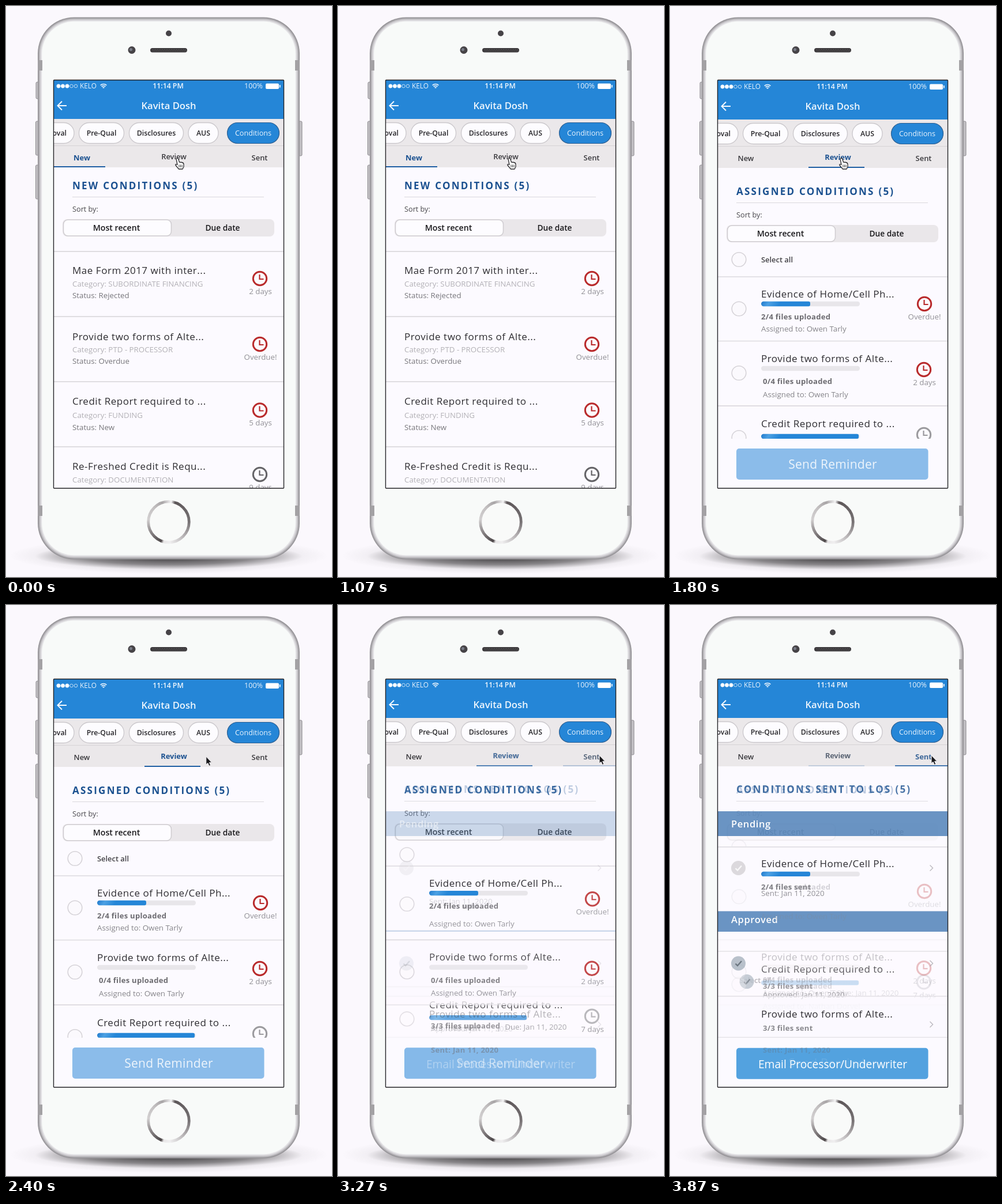
An HTML page with a canvas for the animation above (3.94 s loop, 565 by 991 pixels).

```html
<!DOCTYPE html>
<html lang="en">
<head>
<meta charset="utf-8">
<title>Loan conditions</title>
<style>
html, body { margin: 0; width: 100%; height: 100%; overflow: hidden; background: #fbf8fd; }
canvas { display: block; width: 565px; height: 991px; }
</style>
</head>
<body>
<canvas id="stage" width="565" height="991"></canvas>
<script>
const c = document.getElementById('stage').getContext('2d');
const LOOP = 3940;
const BG = '#fcfaff', BLUE = '#2586d7', NAVY = '#1b5190', RED = '#b92b2c', LINE = '#dfdde1';
const SENT_ON = 'Sent: Jan 11, 2020';

const lerp = (a, b, k) => a + (b - a) * k;
const clamp = k => Math.max(0, Math.min(1, k));
const ease = k => k * k * (3 - 2 * k);

// Draws with the current opacity multiplied by a.
function fade(a, draw) {
  if (a <= 0.003) return;
  c.save();
  c.globalAlpha *= Math.min(1, a);
  draw();
  c.restore();
}

// y is the middle of the capital letters.
function text(s, x, y, size, color, weight = 400, align = 'left', gap = 0) {
  c.font = `${weight} ${size}px "Open Sans", "Noto Sans", sans-serif`;
  c.letterSpacing = gap + 'px';
  c.textAlign = align;
  c.fillStyle = color;
  c.fillText(s, x, y + size * 0.357);
}

function rect(x, y, w, h, color) {
  c.fillStyle = color;
  c.fillRect(x, y, w, h);
}

function round(x, y, w, h, r, fill, stroke, lw = 1) {
  c.beginPath();
  c.roundRect(x, y, w, h, r);
  if (fill) { c.fillStyle = fill; c.fill(); }
  if (stroke) { c.strokeStyle = stroke; c.lineWidth = lw; c.stroke(); }
}

function disc(x, y, r, fill, stroke, lw = 1) {
  c.beginPath();
  c.arc(x, y, r, 0, 7);
  if (fill) { c.fillStyle = fill; c.fill(); }
  if (stroke) { c.strokeStyle = stroke; c.lineWidth = lw; c.stroke(); }
}

function poly(pts, color, lw) {
  c.beginPath();
  for (let i = 0; i < pts.length; i += 2) c.lineTo(pts[i], pts[i + 1]);
  c.strokeStyle = color;
  c.lineWidth = lw;
  c.stroke();
}

const divider = (y, color = LINE, h = 1.6) => rect(83, y - h / 2, 398, h, color);
const rowTitle = (s, x, y) => text(s, x, y, 17, '#2e2d31', 400, 'left', 0.52);
const small = (s, x, y, color = '#86858a') => text(s, x, y, 13.3, color);
const files = (s, x, y) => text(s, x, y, 13, '#6c6b70', 700, 'left', 0.3);
const heading = (s, y) => text(s, 115, y, 17, NAVY, 700, 'left', 2.25);
const option = (y) => disc(119.5, y, 12.3, '#fbf9fd', '#d6d3d8', 1.6);

function clock(x, y, color) {
  disc(x, y, 11.7, null, color, 3);
  poly([x - 0.5, y - 7, x - 0.5, y + 1, x + 6.5, y + 1], color, 2.2);
}

function due(s, y) { text(s, 441, y, 13.3, '#929196', 400, 'center'); }

function tick(x, y, fill, mark) {
  disc(x, y, 12.5, fill);
  poly([x - 5, y + 0.5, x - 1.5, y + 4, x + 5.5, y - 4], mark, 2.4);
}

const chevron = y => poly([450.5, y - 5, 455.5, y, 450.5, y + 5], '#aaa8ae', 1.4);

function bar(y, w) {
  round(158, y - 4.2, 171, 8.4, 4.2, '#e8e6ea');
  if (!w) return;
  const g = c.createLinearGradient(158, y - 5, 190, y + 14);
  g.addColorStop(0, '#1f79cc');
  g.addColorStop(0.35, '#4ba0e3');
  g.addColorStop(0.8, BLUE);
  round(158, y - 4.2, w, 8.4, [4.2, 3, 3, 4.2], g);
}

// The label of a band comes in faster than its colour.
function band(y, s, a) {
  fade(a, () => rect(83, y, 398, 43, '#477bb4'));
  fade(a * 2, () => text(s, 106, y + 22, 16.5, '#fff', 600, 'left', 0.6));
}

function phone() {
  rect(0, 0, 565, 991, '#fbf8fd');
  for (const [rx, ry, y, a] of [[276, 32, 954, 0.2], [232, 23, 955, 0.95]]) {
    c.save();
    c.translate(282, y);
    c.scale(rx, ry);
    const g = c.createRadialGradient(0, 0, 0.1, 0, 0, 1);
    g.addColorStop(0, `rgba(56,54,56,${a})`);
    g.addColorStop(0.6, `rgba(70,68,70,${a * 0.6})`);
    g.addColorStop(1, 'rgba(90,88,90,0)');
    disc(0, 0, 1, g);
    c.restore();
  }
  for (const [x, y, h] of [[52, 132, 29], [51.5, 200, 59], [51.5, 276, 59], [507, 200, 60]])
    round(x, y, 6, h, 2, '#c2c0c4', '#8f8d91');
  const shell = ['#98969a', '#b3b1b5', '#cfcdd1', '#e3e2e5', '#f8faf9'];
  shell.forEach((col, i) => {
    const d = i * 1.8;
    round(55 + d, 19.5 + d, 454 - 2 * d, 941 - 2 * d, 63 - d, col);
  });
  for (const y of [94, 867]) {
    rect(55, y, 8, 18, '#a3a1a4');
    rect(501, y, 8, 18, '#a3a1a4');
  }
  disc(282, 47.5, 5, '#464347');
  disc(218, 76.5, 6.5, '#464347');
  disc(216.5, 75.5, 2.6, '#777a85');
  round(250, 73, 64, 7.5, 3.7, '#3b383b');
  for (let x = 253; x < 312; x += 3) {
    rect(x, 75, 1, 1, '#777');
    rect(x + 1.5, 77.5, 1, 1, '#777');
  }
  const ring = c.createConicGradient(0, 282, 895.5);
  [[0, '#777274'], [0.12, '#b7b3b5'], [0.24, '#f0eff0'], [0.29, '#e8e6e7'], [0.31, '#4d4749'],
   [0.42, '#8c8789'], [0.52, '#d2cfd0'], [0.62, '#c4c1c2'], [0.7, '#a8a4a6'], [0.77, '#f4f3f4'],
   [0.8, '#5c5658'], [1, '#777274']].forEach(s => ring.addColorStop(...s));
  disc(282, 895.5, 35.3, '#f9faf9', ring, 4.8);
}

// Status bar, title, pills and tab strip; tabs holds how active each tab is.
function header(dy, tabs) {
  c.save();
  c.translate(0, dy);
  rect(83, 128, 398, 68, BLUE);
  for (let i = 0; i < 5; i++) disc(91 + i * 7.5, 139, i < 3 ? 3.2 : 2.8, i < 3 ? '#fff' : null, '#e6f1fb', 0.8);
  text('KELO', 128, 139, 11.8, '#e9f3fc');
  for (const r of [2, 5, 8]) {
    c.beginPath();
    c.arc(169, 143.5, r, -2.3, -0.84);
    c.strokeStyle = '#f1f7fd';
    c.lineWidth = 1.7;
    c.stroke();
  }
  text('11:14 PM', 281, 139, 12.3, '#f1f7fd', 600, 'center');
  text('100%', 413, 139, 12.6, '#e9f3fc');
  round(450, 134.5, 23, 9.5, 2, '#fff');
  rect(474, 137, 1.6, 4.5, '#fff');
  poly([105, 173, 90, 173], '#f4f9fe', 2);
  poly([97, 165.5, 89.5, 173, 97, 180.5], '#f4f9fe', 2);
  text('Kavita Dosh', 282, 173, 16.6, '#eef6fd', 600, 'center');

  rect(83, 196, 398, 84, '#ebe8ea');
  rect(83, 242, 398, 1, '#d6d3d6');
  const pill = (x, w, s, tx) => {
    round(x, 202.5, w, 36, 18, '#fdfcff', '#cbc8cc', 1.3);
    text(s, tx, 220.5, 12.3, '#252428', 600, 'center');
  };
  pill(40, 78, 'Approval', 78.5);
  pill(126.5, 78, 'Pre-Qual', 165.5);
  pill(213.5, 94, 'Disclosures', 260.5);
  pill(316, 52, 'AUS', 342);
  round(383.5, 202.5, 90, 36, 18, BLUE, '#2b5f92', 1.2);
  text('Conditions', 428.5, 220.5, 12.6, '#eaf4fd', 400, 'center');

  const names = [['New', 131.5, 263, 83, 89], ['Review', 291, 261, 240, 97], ['Sent', 439.5, 263, 390, 91]];
  names.forEach(([s, x, y, ux, uw], i) => {
    fade(1 - tabs[i], () => text(s, x, y, 12.9, '#39383c', 600, 'center'));
    fade(tabs[i], () => {
      text(s, x, y, 12.9, NAVY, 700, 'center');
      rect(ux, 278, uw, 2, '#1f5fa3');
    });
  });
  c.restore();
}

function sorter(dy) {
  rect(115, 331 + dy, 332, 1, '#dad8dc');
  text('Sort by:', 115, 352 + dy, 12.7, '#4a494d');
  round(98, 370 + dy, 367, 30, 8, '#eae7ea');
  round(99.5, 371 + dy, 187, 28, 8, '#fdfcff', '#cfccd0', 1.5);
  text('Most recent', 191.5, 385 + dy, 14.2, '#19181b', 600, 'center');
  text('Due date', 375.5, 385 + dy, 13.7, '#19181b', 600, 'center');
}

// First tab; k is how far it has given way to the second.
// Rows that stay on the second tab have their titles drawn there.
function newList(k) {
  fade(1 - k, () => {
    heading('NEW CONDITIONS (5)', 311.5 + 10 * k);
    const rows = [
      ['Mae Form 2017 with inter...', 'SUBORDINATE FINANCING', 'Rejected', '2 days', 459, 40],
      ['', 'PTD - PROCESSOR', 'Overdue', 'Overdue!', 573, 38],
      ['', 'FUNDING', 'New', '5 days', 686, 39],
      ['Re-Freshed Credit is Requ...', 'DOCUMENTATION', 'New', '9 days', 799, 38]];
    rows.forEach(([title, cat, status, days, y0, shift], i) => {
      const y = y0 + shift * k, drop = i === 2 ? 1.5 : 0;
      divider(426 + i * 113 + shift * k, LINE, 2);
      rowTitle(title, 115, y);
      small('Category: ' + cat, 115, y + 23 + drop, '#b3b1b6');
      small('Status: ' + status, 115, y + 43.5 + drop, '#77767b');
      clock(440, y + 14 + drop, i < 3 ? RED : '#656468');
      due(days, y + 36 + drop);
    });
  });
}

// Second tab; a is how far it has come in, q how far it has turned into the third.
function reviewList(a, q) {
  const s = 1 - a, stay = 1 - q ** 1.5, out = a * stay;
  const y1 = 499.5 - 62.5 * q, y3 = 725 - 116 * q - 39 * s;
  fade(out, () => heading('ASSIGNED CONDITIONS (5)', 321.5 - 10 * s - q));
  fade(stay, () => sorter(10 * a - Math.min(1, q * 4)));
  fade(out, () => option(440 - 25 * q));
  fade(q, () => {
    heading('CONDITIONS SENT TO LOS (5)', 319.5);
    rect(115, 340, 332, 1, '#dad8dc');
  });
  band(358, 'Pending', q);
  band(524, 'Approved', q);
  fade(a * (1 - 0.65 * q), () => text('Select all', 158 - 47 * q, 440 + 264 * q, 12.9, '#424145', 600));
  fade(q, () => tick(171.5 - 48 * q, 442 + 264 * q, '#a5b2bd', '#56616c'));

  c.save();
  c.beginPath();
  c.rect(83, 281, 398, 470 + 86 * s);
  c.clip();
  // third row
  fade(a, () => divider(y3 - 31));
  rowTitle('Credit Report required to ...', 158 - 43 * s, y3);
  fade(out, () => {
    bar(747 - 114 * q, 169);
    option(749 - 113 * q);
    clock(440, 744 - 112 * q, '#9b9a9e');
    files('3/3 files uploaded', 161, 766 - 131 * q);
    small('|  Due: Jan 11, 2020', 275, 763 - 112 * q);
    text('7 days', 441, 766 - 111 * q, 13.3, '#737277', 400, 'center');
  });
  fade(out * 0.4, () => small('Assigned to: Nathan Dorvel', 161, 787 - 113 * q));
  fade(q, () => {
    files('3/3 files sent', 161, 766 - 131 * q);
    small('Approved: Jan 11, 2020', 161, 766 - 112 * q, '#737277');
  });
  // second row
  fade(a * (1 - q), () => rect(83, 582, 398, 111, BG));
  fade(out, () => {
    divider(581);
    divider(694);
    option(637 - q);
    bar(629 - q, 0);
    files('0/4 files uploaded', 161, 651.5 - q);
    small('Assigned to: Owen Tarly', 161, 674 - q);
    clock(440, 631 - 45 * s - q, RED);
    due('2 days', 653.5 - q);
  });
  fade(stay, () => rowTitle('Provide two forms of Alte...', 158 - 43 * s, 611.5 - 38 * s - q));
  fade(q ** 1.5, () => tick(118.5, 622, '#9daab6', '#4f5a65'));
  fade(q, () => {
    chevron(622);
    rect(83, 679, 398, 72, 'rgba(252,250,255,.7)');
    divider(679);
    divider(750.5);
    chevron(728);
    files('3/3 files sent', 161, 734);
  });
  fade(q * 1.3, () => rowTitle('Provide two forms of Alte...', 158, 710));
  // first row
  fade(a, () => {
    rect(83, y1 - 30, 398, 112, BG);
    divider(y1 - 29.5);
    rowTitle('Evidence of Home/Cell Ph...', 158, y1);
    bar(y1 + 17.5, 85);
  });
  fade(out * (1 - q), () => divider(581.5));
  fade(out, () => {
    option(525.5 - 24 * q);
    files('2/4 files uploaded', 158, y1 + 40);
    small('Assigned to: Owen Tarly', 158, 560 - 25 * q);
    clock(441, 517 - 25 * q, RED);
    due('Overdue!', 539.5 - 25 * q);
  });
  fade(q, () => {
    tick(118.5, 456.5, '#d3d1d5', '#fff');
    chevron(456.5);
    files('2/4 files sent', 158, y1 + 40);
    small(SENT_ON, 158, 521 - 26 * q, '#77767b');
  });
  c.restore();

  // bottom button
  fade(a, () => {
    rect(83, 752, 398, 84, BG);
    const mix = (m, n) => Math.round(lerp(m, n, q * q));
    round(115, 768 + q, 332.5, 54, 5, `rgb(${mix(139, 52)},${mix(188, 147)},${mix(234, 217)})`);
    fade((1 - q) ** 1.3 * 0.85, () => text('Send Reminder', 282, 796, 21, '#fff', 400, 'center', 0.25));
    fade(q * 1.3, () => text('Email Processor/Underwriter', 282, 797, 19.2, '#fff', 400, 'center'));
    fade(Math.min(q * 2.2, 0.55 - 0.3 * q), () => files(SENT_ON, 161, 772));
  });
}

const hand = new Path2D('M-1 1.5Q.5 -1 2.5 1L4.5 7L9 7.5Q12 8 12 11V15L10 19H3.5L-2 12.5Q-3 10 0 11L1 11.5Z');
const arrow = new Path2D('M0 0V14L3 11.2L5.2 16.3L7.8 15.2L5.6 10.3H9.8Z');

function pointer(t) {
  const k = ease(clamp((t - 2230) / 450));
  const x = lerp(296, 453, k), y = lerp(264, 261, k), isHand = x < 315;
  c.save();
  c.translate(x, y);
  c.lineJoin = 'round';
  c.lineWidth = isHand ? 1.3 : 1;
  c.fillStyle = isHand ? '#fff' : '#19181b';
  c.strokeStyle = isHand ? '#2b2a2d' : '#f5f3f6';
  c.fill(isHand ? hand : arrow);
  c.stroke(isHand ? hand : arrow);
  if (isHand) for (const i of [4, 6.5, 9]) poly([i, 11.5, i, 16], '#333', 1);
  c.restore();
}

const SENT_KEYS = [[3130, 0], [3270, 0.27], [3670, 0.51], [3870, 0.8], [3940, 0.89]];

function sentProgress(t) {
  for (let i = 1; i < SENT_KEYS.length; i++) {
    const [t0, p0] = SENT_KEYS[i - 1], [t1, p1] = SENT_KEYS[i];
    if (t < t1) return lerp(p0, p1, clamp((t - t0) / (t1 - t0)));
  }
  return 0.89;
}

function draw(t) {
  const a = ease(clamp((t - 1100) / 600)), q = sentProgress(t);
  phone();
  c.save();
  c.beginPath();
  c.rect(82, 128, 400, 709);
  c.clip();
  rect(82, 128, 400, 709, BG);
  rect(83, 128, 398, 4, BLUE);
  newList(a);
  reviewList(a, q);
  header(a - Math.min(1, q * 4), [1 - a, a * (1 - q), q]);
  c.restore();
  round(82.5, 128.5, 399, 708.5, 1, null, '#242327', 1.4);
  pointer(t);
}

const start = performance.now();
function loop() {
  draw((performance.now() - start) % LOOP);
  requestAnimationFrame(loop);
}
loop();
</script>
</body>
</html>
```
